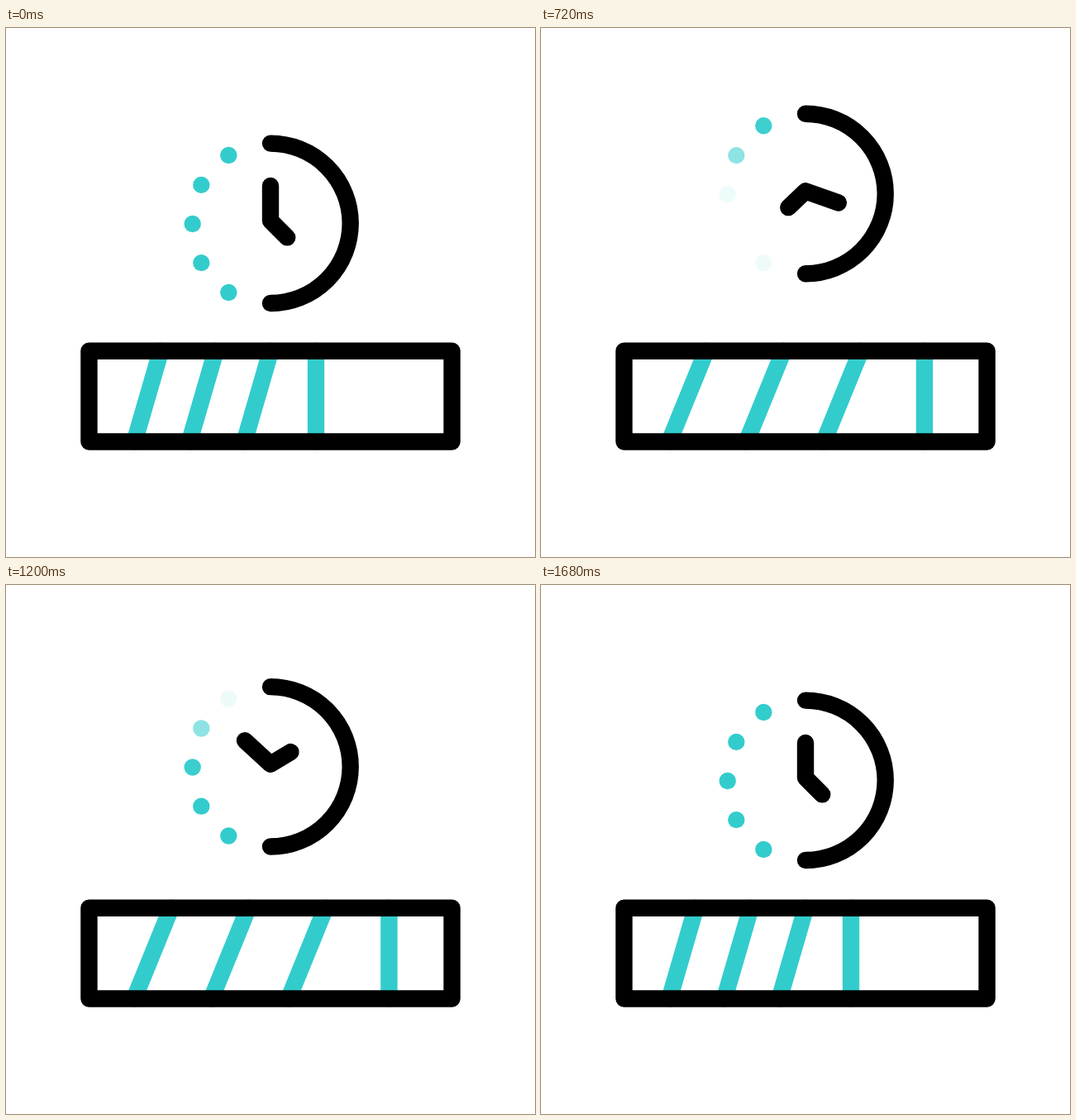
An HTML page with a canvas for the animation above (1.72 s loop, 640x640 px).

```html
<!DOCTYPE html>
<html lang="en">
<head>
<meta charset="utf-8">
<title>Loading timer</title>
<style>
  html, body { margin: 0; width: 100%; height: 100%; overflow: hidden; background: #fff; }
  canvas { display: block; width: 640px; height: 640px; }
</style>
</head>
<body>
<canvas id="stage" width="640" height="640"></canvas>
<script>
const ctx = document.getElementById('stage').getContext('2d');
const LOOP = 1720, STEP = 40, START = 28;
const TEAL = '#33cccc', BLACK = '#000', STROKE = 20.4;

// Cubic Bezier easing with handles (0.58, 0) and (0.575, 1), solved by bisection.
function ease(x) {
  if (x <= 0) return 0;
  if (x >= 1) return 1;
  let low = 0, high = 1, s;
  for (let i = 0; i < 20; i++) {
    s = (low + high) / 2;
    const at = 3 * s * (1 - s) * (0.58 * (1 - s) + 0.575 * s) + s ** 3;
    if (at < x) low = s; else high = s;
  }
  return s * s * (3 - 2 * s);
}

const between = (t, from, to) => ease((t - from) / (to - from));
const rise = (t, from, peak, to) => between(t, from, peak) - between(t, peak, to);

function stroke(color, build) {
  ctx.strokeStyle = color;
  ctx.beginPath();
  build();
  ctx.stroke();
}

function drawBars(t) {
  const anchor = 156.2, reach = 218.8;
  const scale = 1 + 106.3 / reach * rise(t, START, 962, 1638);
  const place = x => anchor + (x - anchor) * scale;
  const bar = (top, bottom) => stroke(TEAL, () => {
    ctx.moveTo(place(top), 390.8);
    ctx.lineTo(place(bottom), 500.5);
  });
  for (let i = 0; i < 3; i++) bar(187.2 + 66.5 * i, 155.4 + 66.5 * i);
  bar(anchor + reach, anchor + reach);
  stroke(BLACK, () => ctx.rect(100.45, 390.8, 439.1, 109.7));
}

// Dots dim and return one after another, from the bottom up.
function drawDots(t) {
  const half = 455;
  const offsets = [[50.7, 83], [83.7, 47.1], [94.3, 0]];
  ctx.fillStyle = TEAL;
  for (let i = 0; i < 5; i++) {
    const [dx, dy] = offsets[Math.min(i, 4 - i)];
    const dark = 604 + 84 * i + 8.6 * i * i;
    ctx.globalAlpha = 1 - rise(t, dark - half, dark, dark + half);
    ctx.beginPath();
    ctx.arc(320 - dx, 237 + (i < 2 ? dy : -dy), 10.2, 0, Math.PI * 2);
    ctx.fill();
  }
  ctx.globalAlpha = 1;
}

function drawHands(t) {
  const x = 320, y = 233.2;
  const handTo = (length, turns) => {
    const a = turns * Math.PI * 2;
    ctx.lineTo(x + length * Math.sin(a), y - length * Math.cos(a));
  };
  stroke(BLACK, () => {
    handTo(42.2, between(t, START, 1560));
    ctx.lineTo(x, y);
    handTo(28.6, 0.375 + between(t, START, 1680));
  });
}

function draw(now) {
  const t = Math.floor((now % LOOP) / STEP) * STEP;
  ctx.fillStyle = '#fff';
  ctx.fillRect(0, 0, 640, 640);
  ctx.lineWidth = STROKE;
  ctx.lineCap = ctx.lineJoin = 'round';
  drawBars(t);
  ctx.save();
  ctx.translate(0, -35.8 * rise(t, START, 706, 1560));
  drawDots(t);
  stroke(BLACK, () => ctx.arc(320, 236.3, 96.7, -Math.PI / 2, Math.PI / 2));
  drawHands(t);
  ctx.restore();
}

const start = performance.now();
function loop() {
  draw(performance.now() - start);
  requestAnimationFrame(loop);
}
loop();
</script>
</body>
</html>
```
